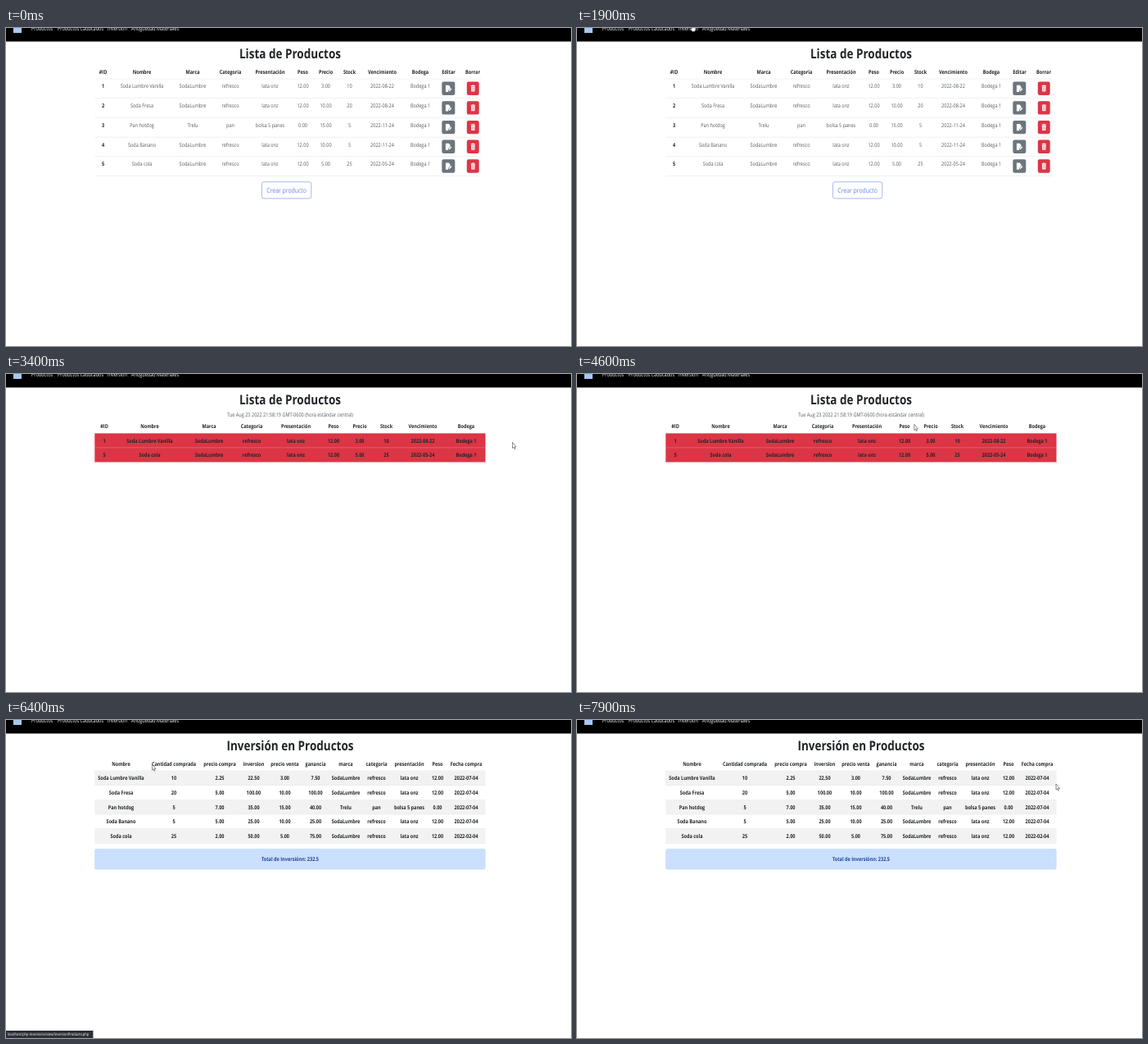
An HTML page that plays this animation: 690x388 px, repeating every 8000 ms.

```html
<!DOCTYPE html>
<html lang="es">
<head>
<meta charset="utf-8">
<title>Inventario</title>
<style>
html, body { margin: 0; width: 100%; height: 100%; overflow: hidden; background: #fff; }
svg { display: block; width: 690px; height: 388px; }
text { font: 6.6px "Open Sans", "Noto Sans", sans-serif; fill: #212529; text-anchor: middle; text-rendering: geometricPrecision; }
.b { font-weight: 700; }
.title { font-size: 16.1px; font-weight: 700; }
.nav, .tip { fill: #fff; text-anchor: start; }
.tip { font-size: 4.75px; }
.cta { font-size: 8.2px; fill: #6684e2; }
.total { font-weight: 700; fill: #1d4497; }
.soft { fill: #555a5f; }
</style>
</head>
<body>
<svg viewBox="0 0 690 388">
  <defs>
    <g id="edit">
      <rect width="16" height="16.4" rx="2.2" fill="#6c757d"/>
      <path d="M4.6 4.2H8.4L10.2 6.2V8L7.8 10.6V12.4H4.6Z" fill="#fff"/>
      <path d="M8.5 11.7V10.6L11 7.8 12 8.9 9.5 11.7Z" fill="#fff"/>
    </g>
    <g id="trash">
      <rect width="14.9" height="16.4" rx="2.2" fill="#dc3545"/>
      <path d="M4.8 4.6H6.5L6.9 4H8.2L8.6 4.6H10.2V5.5H4.8ZM5.1 6H9.9L9.6 12.1H5.4Z" fill="#fff"/>
      <path d="M6.5 7V11.2M7.5 7V11.2M8.5 7V11.2" stroke="#dc3545" stroke-width=".35"/>
    </g>
  </defs>
  <g id="pages"></g>
  <g id="bar"><rect width="690" height="16.5"/><rect x="9" y="-4" width="10" height="10" fill="#a9c8f5"/></g>
  <g id="status"></g>
  <g id="cursor" fill="#fff" stroke="#333" stroke-width=".55" stroke-linejoin="round">
    <path id="arrow" d="M0 0V7.2L1.5 5.8 2.5 8.3 3.5 7.8 2.6 5.5H4.5Z"/>
    <path id="hand" d="M-.7 .6Q0-.5 .7 .6V3.4Q1.3 2.8 1.8 3.7 2.5 3.2 2.9 4.1 3.8 3.8 3.8 4.9V6.6Q3.6 8 2.9 9.3H-.5Q-1.2 7.6-2.4 6-2.2 4.7-.7 5.8Z"/>
  </g>
</svg>
<script>
const $ = id => document.getElementById(id);
const SQUASH = 0.839;   // the page is shown narrower than it is tall
const ROW = 17.68, TALL_ROW = 23.7;

const text = (x, y, s, cls = '') =>
  `<text class="${cls}" transform="translate(${x} ${y}) scale(${SQUASH} 1)">${s}</text>`;
const rect = (x, y, w, h, fill, extra = '') =>
  `<rect x="${x}" y="${y}" width="${w}" height="${h}" fill="${fill}" ${extra}/>`;
const line = (y, right = 585.5, color = '#dee2e6') => rect(108.3, y - .25, right - 108.3, .5, color);
const cells = (cols, values, y, cls) =>
  values.map((v, i) => text(cols[i], y, v, typeof cls === 'function' ? cls(i) : cls)).join('');
const split = s => s.split('|');
const heading = s => text(347, 37.4, s, 'title');

const stock = [
  '1|Soda Lumbre Vanilla|SodaLumbre|refresco|lata onz|12.00|3.00|10|2022-08-22|Bodega 1',
  '2|Soda Fresa|SodaLumbre|refresco|lata onz|12.00|10.00|20|2022-08-24|Bodega 1',
  '3|Pan hotdog|Trelu|pan|bolsa 5 panes|0.00|15.00|5|2022-11-24|Bodega 1',
  '4|Soda Banano|SodaLumbre|refresco|lata onz|12.00|10.00|5|2022-11-24|Bodega 1',
  '5|Soda cola|SodaLumbre|refresco|lata onz|12.00|5.00|25|2022-05-24|Bodega 1'
].map(split);
const stockHead = split('#ID|Nombre|Marca|Categoria|Presentación|Peso|Precio|Stock|Vencimiento|Bodega');

// quantity, cost, invested, price, profit, purchase date
const bought = [
  '10|2.25|22.50|3.00|7.50|2022-07-04',
  '20|5.00|100.00|10.00|100.00|2022-07-04',
  '5|7.00|35.00|15.00|40.00|2022-07-04',
  '5|5.00|25.00|10.00|25.00|2022-07-04',
  '25|2.00|50.00|5.00|75.00|2022-02-04'
].map(split);
const boughtHead = split('Nombre|Cantidad comprada|precio compra|inversion|precio venta|ganancia|marca|categoria|presentación|Peso|Fecha compra');

function productPage() {
  const cols = [118.5, 166, 228, 274, 322.5, 362.5, 390.5, 419.5, 459.5, 506, 540.5, 570];
  let out = heading('Lista de Productos') + cells(cols, [...stockHead, 'Editar', 'Borrar'], 55.6, 'b') + line(62, 581);
  stock.forEach((row, i) => {
    const y = 62 + i * TALL_ROW;
    out += cells(cols, row, y + 11.4, c => c ? 'soft' : 'b') + line(y + TALL_ROW, 581) +
      `<use href="#edit" x="532.3" y="${y + 3.5}"/><use href="#trash" x="562.8" y="${y + 3.5}"/>`;
  });
  return out + rect(312.4, 187.8, 60.4, 20.2, 'none', 'rx="2.6" stroke="#7f9ae8" stroke-width=".7"') +
    text(342.6, 201.4, 'Crear producto', 'cta');
}

function expiredPage() {
  const cols = [120, 175.5, 248, 300, 354, 400, 432, 464.5, 509, 562];
  let out = heading('Lista de Productos') +
    text(347, 52.2, 'Tue Aug 23 2022 21:58:19 GMT-0600 (hora estándar central)', 'soft') +
    cells(cols, stockHead, 66, 'b');
  [stock[0], stock[4]].forEach((row, i) => {
    const y = 72.4 + i * ROW;
    out += rect(108.3, y, 477.2, ROW, '#dc3545') + cells(cols, row, y + 11.4, 'b') + line(y + ROW, 585.5, '#f3cdd1');
  });
  return out;
}

function investmentPage() {
  const cols = [140.5, 205, 261, 302.5, 340.5, 378, 415, 452.5, 492.5, 527, 562];
  let out = heading('Inversión en Productos') + cells(cols, boughtHead, 55.6, 'b') + line(62);
  bought.forEach((b, i) => {
    const y = 62 + i * ROW;
    const row = [stock[i][1], ...b.slice(0, 5), ...stock[i].slice(2, 6), b[5]];
    if (i % 2 === 0) out += rect(108.3, y, 477.2, ROW, '#f2f2f2');
    out += cells(cols, row, y + 11.4, 'b') + line(y + ROW);
  });
  return out + rect(108.5, 157.2, 476.8, 25, '#cbdffe', 'rx="1.8" stroke="#b9d3fc" stroke-width=".4"') +
    text(347, 172.4, 'Total de Inversiónn: 232.5', 'total');
}

const tip = (file, w) => `<g>${rect(0, 379, w, 9, '#2b2f36')}${text(2, 385.3, `localhost/php-inventario/view/${file}.php`, 'tip')}</g>`;

$('pages').innerHTML = [productPage, expiredPage, investmentPage].map(f => `<g>${f()}</g>`).join('');
$('status').innerHTML = tip('productosCaducados', 112.4) + tip('inversionProducto', 106.4);
$('bar').innerHTML += text(31, 3.4, 'Productos', 'nav') + text(63, 3.4, 'Productos Caducados', 'nav') +
  text(124, 3.4, 'Inversion', 'nav') + text(153, 3.4, 'Antiguedad Materiales', 'nav');

// time, x, y of the pointer tip
const path = [
  [500, 418, 208], [700, 368, 234], [900, 290, 248], [1100, 208, 184], [1300, 152, 90],
  [1400, 200, 150], [1600, 300, 80], [1750, 220, 18], [1900, 141, -5], [2100, 92, 0], [2200, 99.5, 2],
  [2500, 99.5, 2], [2700, 99.5, 12.5], [2900, 260, 50], [3200, 578, 74], [3400, 618.5, 83.3],
  [3700, 590, 100], [4100, 515, 104], [4500, 430, 70], [5000, 339.5, 27], [5200, 339.5, 27],
  [5500, 99.5, 1.5], [5700, 99.5, 1.5], [5900, 134, 0], [6200, 134, 0], [6500, 200.7, 81],
  [6800, 260, 140], [7100, 345, 178], [7400, 480, 120], [7700, 590, 60], [7900, 585, 78]
];

function pointAt(t) {
  const i = path.findIndex(p => p[0] > t);
  if (i < 0) return path[path.length - 1].slice(1);
  const [t0, x0, y0] = path[i - 1], [t1, x1, y1] = path[i];
  const k = (t - t0) / (t1 - t0);
  return [x0 + (x1 - x0) * k, y0 + (y1 - y0) * k];
}

const show = (el, on) => { el.style.display = on ? '' : 'none'; };
const choose = (parent, index) => [...parent.children].forEach((el, i) => show(el, i === index));
const between = (t, a, b) => t >= a && t < b;

function draw(now) {
  const t = Math.floor(now % 8000 / 100) * 100;
  choose($('pages'), t < 2400 ? 0 : t < 6000 ? 1 : 2);
  choose($('status'), between(t, 2400, 2900) || between(t, 5500, 5900) ? 0 : between(t, 5900, 6700) ? 1 : -1);
  show($('cursor'), t >= 500);
  if (t >= 500) {
    const [x, y] = pointAt(t);
    $('cursor').setAttribute('transform', `translate(${x} ${y})`);
    show($('hand'), y < 14);
    show($('arrow'), y >= 14);
  }
}

const start = performance.now();
function loop() {
  draw(performance.now() - start);
  requestAnimationFrame(loop);
}
loop();
</script>
</body>
</html>
```
